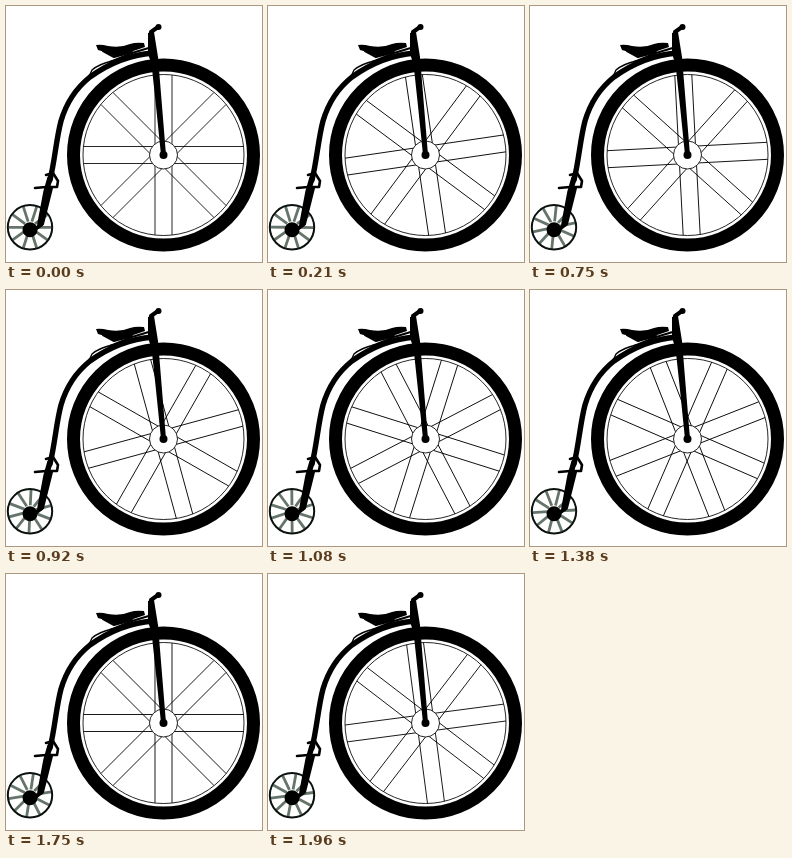
These frames come from a looping animation (256x256 px, 2 s). An HTML page with a canvas:

```html
<!DOCTYPE html>
<html lang="en">
<head>
<meta charset="utf-8">
<title>Penny-farthing</title>
<style>
html, body { margin: 0; width: 100%; height: 100%; overflow: hidden; background: #fff; }
canvas { display: block; width: 256px; height: 256px; }
</style>
</head>
<body>
<canvas id="stage" width="256" height="256"></canvas>
<script>
const ctx = document.getElementById('stage').getContext('2d');
const LOOP = 2000, FPS = 24, TAU = Math.PI * 2;
const INK = '#000', HAIR = 0.85;
const BIG = { x: 157.5, y: 149 };
const SMALL = { x: 24, y: 221.3 };

// [step, degrees]
const TURN = [[0, 0], [18, 132], [26, 197.5], [33, 248.5], [42, 315], [48, 360]];

function angleAt(step) {
  let i = 1;
  while (step > TURN[i][0]) i++;
  const [s0, a0] = TURN[i - 1], [s1, a1] = TURN[i];
  return (a0 + (a1 - a0) * (step - s0) / (s1 - s0)) * TAU / 360;
}

function stepAt(ms) {
  const t = Math.floor((ms % LOOP) / 10) * 10;
  return Math.ceil((t + 5) * FPS / 1000) - 1;
}

function ring(c, r, width, color = INK) {
  ctx.beginPath();
  ctx.arc(c.x, c.y, r, 0, TAU);
  ctx.lineWidth = width;
  ctx.strokeStyle = color;
  ctx.stroke();
}

function disc(x, y, r, color = INK) {
  ctx.beginPath();
  ctx.arc(x, y, r, 0, TAU);
  ctx.fillStyle = color;
  ctx.fill();
}

function stroke(d, width) {
  ctx.lineWidth = width;
  ctx.strokeStyle = INK;
  ctx.stroke(new Path2D(d));
}

function fill(d) {
  ctx.fillStyle = INK;
  ctx.fill(new Path2D(d));
}

function bigWheel(angle) {
  ring(BIG, 90, 13);
  ring(BIG, 80.5, HAIR);
  ctx.save();
  ctx.translate(BIG.x, BIG.y);
  ctx.rotate(angle);
  ctx.lineWidth = HAIR;
  ctx.strokeStyle = INK;
  ctx.beginPath();
  for (let i = 0; i < 4; i++) {
    for (const off of [-8.5, 8.5]) {
      ctx.moveTo(-80, off);
      ctx.lineTo(80, off);
    }
    ctx.rotate(TAU / 8);
  }
  ctx.stroke();
  ctx.restore();
  disc(BIG.x, BIG.y, 14, '#fff');
  ring(BIG, 14, HAIR);
}

function smallWheel(angle) {
  ctx.save();
  ctx.translate(SMALL.x, SMALL.y);
  ctx.rotate(angle);
  ctx.lineWidth = 2.8;
  ctx.strokeStyle = '#66756a';
  ctx.beginPath();
  for (let i = 0; i < 10; i++) {
    ctx.moveTo(6, 0);
    ctx.lineTo(21.5, 0);
    ctx.rotate(TAU / 10);
  }
  ctx.stroke();
  ctx.restore();
  ring(SMALL, 22.2, 2, '#0b120d');
  disc(SMALL.x, SMALL.y + 2.5, 7.5);
}

function frame() {
  ctx.lineCap = ctx.lineJoin = 'round';
  // backbone and rear fork
  stroke('M147 47C122 49 102 58 84 71C69 83 60 98 55 115C50 134 49 154 44 174', 5.4);
  stroke('M82 73L86 64Q93 58 106 55', 1.4);
  stroke('M104 56L126 47L146 41', 2);
  stroke('M44 172L40 186L34 218', 5.5);
  stroke('M45 182L36 218L28 224', 4);
  stroke('M29 182L40 181L51 181L52 175L47 167L40 169', 2.6);
  // saddle
  fill('M90 39Q95 38 102 40Q115 42 124 38Q130 36 138 37L139 41Q126 45 115 50Q105 51 99 46L92 44Z');
  stroke('M97 45L108 51L126 46', 2);
  // handlebar, head and front fork
  stroke('M152 21L145 26L144 34', 4);
  disc(152.5, 21, 3);
  fill('M142 27L148 26L152 51L156 100L160 149L155 149L150 100L145.5 58L142 48Z');
  disc(157.5, 149, 4);
}

function draw(ms) {
  const angle = angleAt(stepAt(ms));
  ctx.fillStyle = '#fff';
  ctx.fillRect(0, 0, 256, 256);
  ctx.lineCap = 'butt';
  bigWheel(angle);
  smallWheel(angle);
  frame();
}

const start = performance.now();
function tick() {
  draw(performance.now() - start);
  requestAnimationFrame(tick);
}
tick();
</script>
</body>
</html>
```
